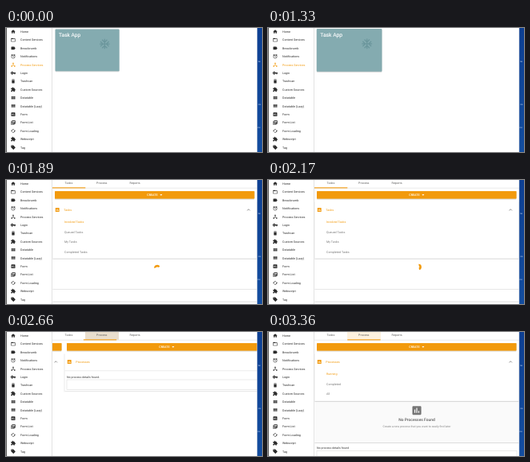
An HTML page for the animation above (4.97 s loop, 320 by 156 pixels).

```html
<!DOCTYPE html>
<html lang="en">
<head>
<meta charset="utf-8">
<title>Process services demo</title>
<style>
html, body { margin: 0; width: 100%; height: 100%; overflow: hidden; background: #fff; }
svg { display: block; width: 100vw; height: 100vh; }
text { font-family: Roboto, Arial, sans-serif; font-size: 3.73px; text-rendering: geometricPrecision; }
</style>
</head>
<body>
<svg id="stage" viewBox="0 0 320 156"></svg>
<script>
const LOOP = 4970, STEP = 70;
const ORANGE = '#f29a0c', INK = '#2b2b2b', GREY = '#777', LINE = '#dcdcdc';
const LEFT = 58, PAGE = 256;

const icons = {
  home: 'M10 20v-6h4v6h5v-8h3L12 3 2 12h3v8z',
  folder: 'M20 6h-8l-2-2H4c-1.1 0-2 .9-2 2v12c0 1.1.9 2 2 2h16c1.1 0 2-.9 2-2V8c0-1.1-.9-2-2-2zm0 12H4V8h16z',
  label: 'M17.6 5.8C17.3 5.3 16.7 5 16 5H5c-1.1 0-2 .9-2 2v10c0 1.1.9 2 2 2h11c.7 0 1.3-.3 1.6-.8L22 12z',
  alarm: 'M12 4a9 9 0 1 0 0 18a9 9 0 0 0 0-18zm0 2a7 7 0 1 1 0 14a7 7 0 0 1 0-14zM11 8v6l5 3 .8-1.3-4.2-2.5V8zM7.9 3.4L6.6 1.9 2 5.7l1.3 1.5zM22 5.7l-4.6-3.8-1.3 1.5 4.6 3.8z',
  hub: 'M17 16l-4-4V8.8a3 3 0 1 0-2 0V12l-4 4H3v5h5v-3l4-4.2 4 4.2v3h5v-5z',
  key: 'M12.6 10a6 6 0 1 0 0 4H17v4h4v-4h2v-4zM7 14a2 2 0 1 1 0-4a2 2 0 0 1 0 4z',
  bin: 'M6 19c0 1.1.9 2 2 2h8c1.1 0 2-.9 2-2V7H6zM19 4h-3.5l-1-1h-5l-1 1H5v2h14z',
  puzzle: 'M20.5 11H19V7c0-1.1-.9-2-2-2h-4V3.5a2.5 2.5 0 0 0-5 0V5H4c-1.1 0-2 .9-2 2v3.8h1.5a2.7 2.7 0 0 1 0 5.4H2V20c0 1.1.9 2 2 2h3.8v-1.5a2.7 2.7 0 0 1 5.4 0V22H17c1.1 0 2-.9 2-2v-4h1.5a2.5 2.5 0 0 0 0-5z',
  grid: 'M4 11h5V5H4zm0 7h5v-6H4zm6 0h5v-6h-5zm6 0h5v-6h-5zm-6-7h5V5h-5zm6-6v6h5V5z',
  chart: 'M19 3H5c-1.1 0-2 .9-2 2v14c0 1.1.9 2 2 2h14c1.1 0 2-.9 2-2V5c0-1.1-.9-2-2-2zM9 17H7v-7h2zm4 0h-2V7h2zm4 0h-2v-4h2z',
  books: 'M4 6H2v14c0 1.1.9 2 2 2h14v-2H4zm16-4H8c-1.1 0-2 .9-2 2v12c0 1.1.9 2 2 2h12c1.1 0 2-.9 2-2V4c0-1.1-.9-2-2-2zm-1 9H9V9h10zm-4 4H9v-2h6zm4-8H9V5h10z',
  cycle: 'M19 8l-4 4h3a6 6 0 0 1-8.8 5.3l-1.5 1.5A8 8 0 0 0 20 12h3zM6 12a6 6 0 0 1 8.8-5.3l1.5-1.5A8 8 0 0 0 4 12H1l4 4 4-4z',
  tag: 'M21.4 11.6l-9-9C12 2.2 11.5 2 11 2H4c-1.1 0-2 .9-2 2v7c0 .5.2 1 .6 1.4l9 9c.8.8 2 .8 2.8 0l7-7c.8-.8.8-2 0-2.8zM5.5 7a1.5 1.5 0 1 1 0-3a1.5 1.5 0 0 1 0 3z',
  snow: 'M22 11h-4.2l3.3-3.2-1.4-1.5L15 11h-2V9l4.7-4.7-1.5-1.4L13 6.2V2h-2v4.2L7.8 2.9 6.3 4.3 11 9v2H9L4.3 6.3 2.9 7.8 6.2 11H2v2h4.2l-3.3 3.2 1.4 1.5L9 13h2v2l-4.7 4.7 1.5 1.4 3.2-3.3V22h2v-4.2l3.2 3.3 1.5-1.4L13 15v-2h2l4.7 4.7 1.4-1.5-3.3-3.2H22z'
};
const menu = [
  ['home', 'Home'], ['folder', 'Content Services'], ['label', 'Breadcrumb'],
  ['alarm', 'Notifications'], ['hub', 'Process Services'], ['key', 'Login'],
  ['bin', 'Trashcan'], ['puzzle', 'Custom Sources'], ['grid', 'Datatable'],
  ['grid', 'Datatable (Lazy)'], ['chart', 'Form'], ['books', 'Form List'],
  ['cycle', 'Form Loading'], ['puzzle', 'Webscript'], ['tag', 'Tag']
];

const rect = (x, y, w, h, fill, more = '') =>
  `<rect x="${x}" y="${y}" width="${w}" height="${h}" fill="${fill}" ${more}/>`;
const text = (x, y, s, fill = INK, more = '') =>
  `<text x="${x}" y="${y}" fill="${fill}" ${more}>${s}</text>`;
const group = (id, body, more = '') => `<g id="${id}" ${more}>${body}</g>`;
const icon = (name, cx, cy, size, fill) =>
  `<path d="${icons[name]}" fill="${fill}" fill-rule="evenodd" transform="translate(${cx - size / 2} ${cy - size / 2}) scale(${size / 24})"/>`;
const middle = 'text-anchor="middle"';

function sidebar() {
  const rows = menu.map(([name, label], i) => {
    const y = 4.6 + i * 10.4;
    const row = icon(name, 9, y, 6.6, 'currentColor') + text(18, y + 1.35, label, 'currentColor');
    return group('item' + i, row, `color="${INK}"`);
  });
  return rect(0, 0, 57, 156, '#fff') + rows.join('') +
    rect(57, 0, .8, 156, LINE) + rect(0, 0, .9, 156, '#4a4a4a');
}

function card() {
  return rect(61.6, 1.6, 80, 52.6, '#84abb0', 'rx=".8" filter="url(#shade)"') +
    icon('snow', 123.3, 20, 15, '#6b969c') +
    text(66, 11.2, 'Task App', '#fff', 'style="font-size:6.6px" stroke="#fff" stroke-width=".12"');
}

function createBar() {
  return rect(61, 14, 249.5, 9.4, ORANGE, 'rx=".6" filter="url(#shade)"') +
    text(183, 20, 'CREATE', '#fff', middle + ' font-weight="500"') +
    '<path d="M192.4 18.1h3l-1.5 1.6z" fill="#fff"/>';
}

function panel(height) {
  return rect(58.4, 27, 255, height, '#fff', 'filter="url(#shade)"');
}

function header(label) {
  return icon('chart', 64.2, 37.5, 6.6, ORANGE) +
    text(72.3, 39, label, ORANGE) +
    '<path d="M301.6 38.4l1.7-1.7 1.7 1.7" fill="none" stroke="#666" stroke-width=".7"/>';
}

function filters(names) {
  return names.map((name, i) => text(73, 54.3 + i * 12.4, name, i ? GREY : ORANGE)).join('');
}

const rule = (y, color = LINE) => rect(58.4, y, 255, .7, color);
const spinner = (id, cy) => group(id,
  `<path d="M-2.4 .6A2.4 1.9 0 0 1 2.2 -.6" transform="translate(0 .4)" fill="none" stroke="${ORANGE}" stroke-width="2.6"/>`,
  `data-y="${cy}"`);
const details = (y, s) => text(61, y, s, '#333', 'style="font-size:3.62px"');
const emptyBox = (y, h) => rect(61, y, 250, h, '#fff', `stroke="${LINE}" stroke-width=".6"`);

const collapsed = (id, s) => group(id,
  panel(47.2) + rule(48.5, '#e4e4e4') + details(57.9, s) + emptyBox(60, 12.4));

function tasksPage() {
  return createBar() +
    collapsed('tasksWait', 'No task details found.') +
    group('tasksReady', panel(71.6) +
      filters(['Involved Tasks', 'Queued Tasks', 'My Tasks', 'Completed Tasks']) +
      spinner('tasksSpin', 109.6) + rule(137) + rule(152.8, '#cfcfcf')) +
    group('tasksHead', header('Tasks'));
}

function processPage() {
  const empty = rect(58.4, 87.6, 255, 51.6, '#fafafa') +
    icon('chart', 186, 98.7, 14.8, '#757575') +
    text(186, 112.4, 'No Processes Found', '#5c5c5c', middle + ' style="font-size:4.95px" font-weight="500"') +
    text(186, 120.4, 'Create a new process that you want to easily find later', '#858585', middle + ' style="font-size:3.55px"') +
    rule(139.2, '#cfcfcf') + details(146.9, 'No process details found') + emptyBox(149.4, 12);
  const loading = spinner('processSpin', 97) +
    rule(139.2, '#cfcfcf') + details(148, 'No process details found') + emptyBox(150.6, 12);
  return createBar() +
    collapsed('processWait', 'No process details found.') +
    group('processReady', group('empty', empty) + group('loading', loading) +
      panel(59.8) + filters(['Running', 'Completed', 'All'])) +
    header('Processes');
}

function tabs() {
  const names = ['Tasks', 'Process', 'Reports'];
  return rect(LEFT, 0, PAGE, 10.4, '#fff') +
    group('focus', rect(99, 0, 42, 9.8, '#fdf1df')) +
    group('ripple', rect(99, 0, 42, 9.8, '#000')) +
    names.map((s, i) => text(78.5 + i * 41.3, 5, s, '#606060', middle)).join('') +
    rect(LEFT, 9.8, PAGE, .6, LINE) +
    group('ink', rect(LEFT, 9.3, 41.3, 1.1, ORANGE));
}

function strip() {
  const marks = [[315, 43], [315.5, 97.2], [314.6, 126]];
  return rect(314, 0, 6, 156, 'url(#blue)') + rect(313.6, 0, .6, 156, '#b8c4d6') +
    marks.map(([x, y]) => text(x, y, 'ne', '#dbe6f6', 'style="font-size:2.8px"')).join('');
}

const stage = document.getElementById('stage');
stage.innerHTML = `<defs>
  <filter id="shade" x="-5%" y="-10%" width="110%" height="130%">
    <feDropShadow dx="0" dy=".5" stdDeviation=".5" flood-opacity=".35"/></filter>
  <linearGradient id="blue" x2="0" y2="1">
    <stop stop-color="#0d3f92"/><stop offset="1" stop-color="#134d9f"/></linearGradient>
  <clipPath id="view"><rect id="window" x="${LEFT}" y="0" width="${PAGE}" height="156"/></clipPath>
  </defs>` + rect(0, 0, 320, 156, '#fff') +
  group('card', card()) +
  group('app', group('pages', group('tasks', tasksPage()) + group('process', processPage()), 'clip-path="url(#view)"') + tabs()) +
  sidebar() + strip();

const $ = id => document.getElementById(id);
const show = (id, on) => $(id).setAttribute('display', on ? 'inline' : 'none');
const shift = (id, x) => $(id).setAttribute('transform', `translate(${x} 0)`);
const ramp = (t, from, to) => Math.min(1, Math.max(0, (t - from) / (to - from)));

// cubic-bezier(.35, 0, .25, 1)
function ease(x) {
  let lo = 0, hi = 1, s = x;
  for (let i = 0; i < 24; i++) {
    s = (lo + hi) / 2;
    const at = 3 * (1 - s) ** 2 * s * .35 + 3 * (1 - s) * s * s * .25 + s ** 3;
    if (at < x) lo = s; else hi = s;
  }
  return 3 * s * s - 2 * s ** 3;
}

function spin(id, t) {
  const g = $(id);
  g.setAttribute('transform', `translate(189 ${g.dataset.y}) rotate(${t * .36 % 360})`);
}

function draw(t) {
  const opened = t >= 1470;
  const grow = 1 + .02 * ramp(t, 910, 1120);
  show('card', !opened);
  $('card').setAttribute('transform', `translate(101.6 27.9) scale(${grow}) translate(-101.6 -27.9)`);
  $('item4').setAttribute('color', opened ? INK : ORANGE);

  show('app', opened);
  show('tasksWait', t >= 1540 && t < 1890);
  show('tasksHead', t >= 1540);
  show('tasksReady', t >= 1890);

  const move = ease(ramp(t, 2300, 2800));
  const sliding = t > 2300 && t < 2800;
  shift('tasks', -PAGE * move);
  shift('process', PAGE * (1 - move));
  shift('ink', 41.3 * move);
  show('tasks', t < 2800);
  show('process', t > 2300);
  $('window').setAttribute('height', sliding ? 75.5 : 156);

  show('focus', t >= 2300);
  $('ripple').setAttribute('opacity', .14 * ramp(t, 2230, 2380) * (1 - ramp(t, 2450, 2940)));

  const listed = t >= 2800;
  show('processWait', !listed);
  show('processReady', listed);
  show('loading', t < 3360);
  show('empty', t >= 3360);
  spin('tasksSpin', t - 1890);
  spin('processSpin', t - 2870);
}

const start = performance.now();
function tick() {
  const t = (performance.now() - start) % LOOP;
  draw(Math.floor(t / STEP) * STEP);
  requestAnimationFrame(tick);
}
tick();
</script>
</body>
</html>
```
